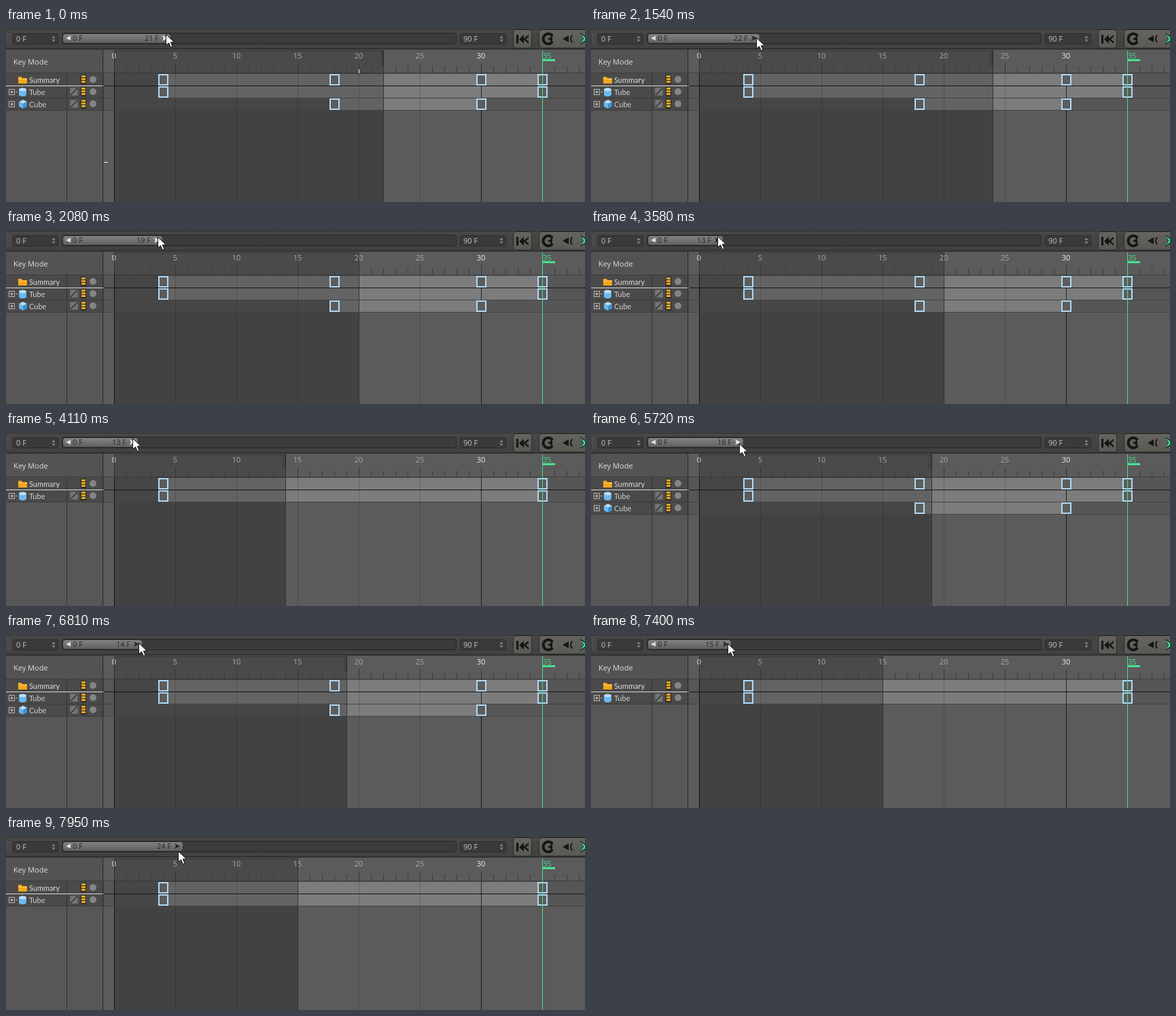
An HTML page with a canvas that plays this animation: 852 px wide and 257 px high, repeating every 8 s.

```html
<!DOCTYPE html>
<html lang="en">
<head>
<meta charset="utf-8">
<title>Timeline preview range</title>
<style>
html, body { margin: 0; width: 852px; height: 257px; overflow: hidden; background: #484848; }
canvas { display: block; }
</style>
</head>
<body>
<canvas id="stage" width="852" height="257"></canvas>
<script>
const ctx = document.getElementById('stage').getContext('2d');
const W = 852, H = 257, LOOP = 8000;
const SANS = '11px "Open Sans", "Noto Sans", sans-serif';
const NAMES = '11px Lato, "Open Sans", sans-serif';
const BLACK = '#151515', GREEN = '#49dc8c';

// Each drag: press and release times, step length, pointer path as [time, x, y]
const drags = [
  { from: 330, to: 950, step: 60, path: [[270, 235, 9], [750, 247, 13]] },
  { from: 1350, to: 2080, step: 63.3, path: [[1287, 247, 13], [1540, 243, 14], [1980, 223, 10]] },
  { from: 2540, to: 4110, step: 69.3, path: [[2471, 223, 10], [3340, 195, 9], [3578, 186, 9]] },
  { from: 4910, to: 5720, step: 61.4, path: [[4849, 186, 9], [5339, 211, 16], [5585, 218, 17]] },
  { from: 6320, to: 6940, step: 70, path: [[6250, 218, 17], [6810, 195, 13]] },
  { from: 7400, to: LOOP, step: 68.7, path: [[7331, 195, 13], [7949, 253, 22]] }
];
// Preview range after each release
const ranges = [[0, 22], [950, 24], [2080, 20], [4110, 14], [5720, 19], [6940, 15]];

const frameX = f => 159 + 18 * f;

function along(path, t) {
  if (t <= path[0][0]) return path[0].slice(1);
  for (let i = 1; i < path.length; i++) {
    const a = path[i - 1], b = path[i];
    if (t <= b[0]) {
      const k = (t - a[0]) / (b[0] - a[0]);
      return [1, 2].map(j => Math.round(a[j] + (b[j] - a[j]) * k));
    }
  }
  return path[path.length - 1].slice(1);
}

function stateAt(t) {
  const drag = drags.filter(d => t >= d.from).pop();
  let pos = [235, 9];
  if (drag) {
    const steps = Math.floor((t - drag.from) / drag.step + 0.001);
    pos = along(drag.path, drag.from + steps * drag.step);
  }
  const range = ranges.filter(r => t >= r[0]).pop()[1];
  return {
    x: pos[0], y: pos[1], range,
    last: Math.round((pos[0] - 109.5) / 6),
    pressed: !!drag && t < drag.to,
    marks: t < 330,
    cube: range > 18
  };
}

function rect(x, y, w, h, color) {
  ctx.fillStyle = color;
  ctx.fillRect(x, y, w, h);
}

function frame(x, y, w, h, color) {
  ctx.strokeStyle = color;
  ctx.lineWidth = 1;
  ctx.strokeRect(x + 0.5, y + 0.5, w - 1, h - 1);
}

function round(x, y, w, h, r, fill, stroke) {
  ctx.beginPath();
  ctx.roundRect(x + 0.5, y + 0.5, w - 1, h - 1, r);
  ctx.fillStyle = fill;
  ctx.fill();
  ctx.strokeStyle = stroke;
  ctx.lineWidth = 1;
  ctx.stroke();
}

function poly(points, color) {
  ctx.beginPath();
  points.forEach(p => ctx.lineTo(p[0], p[1]));
  ctx.closePath();
  ctx.fillStyle = color;
  ctx.fill();
}

function line(x1, y1, x2, y2, color, width = 1) {
  ctx.beginPath();
  ctx.moveTo(x1, y1);
  ctx.lineTo(x2, y2);
  ctx.strokeStyle = color;
  ctx.lineWidth = width;
  ctx.stroke();
}

function arc(x, y, r, a, b, color, width) {
  ctx.beginPath();
  ctx.arc(x, y, r, a, b);
  ctx.strokeStyle = color;
  ctx.lineWidth = width;
  ctx.stroke();
}

function text(s, x, y, color, align = 'left', font = SANS) {
  ctx.font = font;
  ctx.textAlign = align;
  ctx.fillStyle = color;
  ctx.fillText(s, x, y);
}

function shade(y0, y1, top, bottom) {
  const g = ctx.createLinearGradient(0, y0, 0, y1);
  g.addColorStop(0, top);
  g.addColorStop(1, bottom);
  return g;
}

function field(x, w, label) {
  round(x, 8, w, 16, 2, '#3a3a3a', '#2a2a2a');
  text(label, x + 5, 20, '#c4c4c4');
  const s = x + w - 7;
  poly([[s - 2.5, 15], [s, 11.5], [s + 2.5, 15]], '#858585');
  poly([[s - 2.5, 17], [s, 20.5], [s + 2.5, 17]], '#858585');
}

function transport() {
  const face = shade(2, 30, '#66645e', '#5a5954');
  round(746, 2, 28, 28, 4, face, '#2b2b2b');
  round(784, 2, 80, 28, 4, face, '#2b2b2b');
  rect(751, 10, 3, 13, BLACK);
  poly([[762, 10], [755, 16.5], [762, 23]], BLACK);
  poly([[769, 10], [761, 16.5], [769, 23], [769, 20], [765, 16.5], [769, 13]], BLACK);
  arc(798, 16, 7.5, 0.6, Math.PI * 2 - 0.6, BLACK, 4);
  poly([[797, 16], [804, 12], [804, 20]], BLACK);
  poly([[819, 16], [828, 11], [828, 21]], BLACK);
  arc(838, 16, 7, Math.PI - 0.85, Math.PI + 0.85, BLACK, 2);
  poly([[845, 7], [858, 16], [845, 25], [849, 16]], BLACK);
  poly([[846, 9], [856, 16], [846, 23], [850, 16]], '#35e093');
}

function topBar(s) {
  rect(0, 0, W, 32, shade(0, 32, '#484848', '#404040'));
  rect(0, 0, W, 1, '#4e4e4e');
  rect(0, 1, W, 1, '#292929');
  for (let y = 8; y < 25; y += 3) {
    rect(2, y, 1, 1, '#777777');
    rect(5, y + 1, 1, 1, '#777777');
  }
  field(10, 67, '0 F');
  field(668, 68, '90 F');
  round(82, 7, 581, 17, 3, '#3b3b3b', '#262626');
  const end = 117 + 6 * s.last;
  round(83, 8, end - 83, 15, 4, shade(8, 23, '#868686', '#5d5d5d'), '#303030');
  poly([[88, 15], [95, 11.5], [95, 18.5]], '#dddddd');
  text('0 F', 98, 19, '#292929');
  text(s.last + ' F', end - 18, 19, '#292929', 'right');
  poly([[end - 5, 15], [end - 13, 11], [end - 11, 15], [end - 13, 19]],
    s.pressed ? '#252525' : '#eeeeee');
  transport();
  rect(0, 30, W, 2, '#303030');
}

function expander(y) {
  frame(4, y - 5, 9, 9, '#b5b5b5');
  rect(6, y - 1, 5, 1, '#c8c8c8');
  rect(8, y - 3, 1, 5, '#c8c8c8');
}

function rowTools(y, slash) {
  rect(110, y - 7, 8, 14, '#282828');
  for (let i = 0; i < 3; i++) rect(111, y - 6 + i * 4, 6, 3, '#f5a71c');
  ctx.beginPath();
  ctx.arc(128, y, 5, 0, 7);
  ctx.fillStyle = '#858585';
  ctx.fill();
  if (slash) {
    rect(94, y - 6, 12, 12, '#757575');
    frame(94, y - 6, 12, 12, '#666666');
    line(95, y + 5, 105, y - 5, '#303030', 1.4);
  }
}

function tubeIcon(y) {
  poly([[19, y - 4], [30, y - 4], [30, y + 4], [27, y + 6], [22, y + 6], [19, y + 4]], '#6db8ee');
  ctx.beginPath();
  ctx.ellipse(24.5, y - 4, 5.5, 2.4, 0, 0, 7);
  ctx.fillStyle = '#b7defa';
  ctx.fill();
}

function cubeIcon(y) {
  poly([[19, y - 4], [25, y - 7], [31, y - 4], [25, y - 1]], '#b7defa');
  poly([[19, y - 4], [25, y - 1], [25, y + 6], [19, y + 3]], '#68b7ed');
  poly([[31, y - 4], [25, y - 1], [25, y + 6], [31, y + 3]], '#3f93d2');
}

function panel(s) {
  const bottom = s.cube ? 121 : 103;
  rect(0, 32, 144, H - 32, '#575757');
  rect(0, 32, 144, 35, '#535353');
  rect(0, 67, 144, bottom - 67, '#4a4a4a');
  text('Key Mode', 11, 54, '#dddddd');
  rect(0, 66, 144, 1, '#3b3b3b');
  rect(89, 67, 1, H - 67, '#323232');
  rect(0, 103, 144, 1, '#3b3b3b');
  poly([[18, 72], [23, 72], [24, 74], [31, 74], [31, 82], [18, 82]], '#f8a51b');
  rect(18, 75, 13, 1, '#ffc75c');
  text('Summary', 34, 81, '#dddddd', 'left', NAMES);
  rowTools(76, false);
  rect(0, 85, 144, 1, '#d8d8d8');
  expander(95);
  rect(14, 94, 3, 1, '#b5b5b5');
  tubeIcon(95);
  text('Tube', 34, 99, '#d0d0d0', 'left', NAMES);
  rowTools(94, true);
  if (s.cube) {
    rect(0, 121, 144, 1, '#3b3b3b');
    expander(113);
    cubeIcon(113);
    text('Cube', 34, 117, '#d0d0d0', 'left', NAMES);
    rowTools(112, true);
  }
  rect(142, 32, 1, H - 32, '#2b2b2b');
}

function bar(a, b, y, end) {
  const x0 = frameX(a), x1 = frameX(b);
  rect(x0, y, x1 - x0, 17, '#7c7c7c');
  const dark = Math.min(x1, end) - x0;
  if (dark > 0) rect(x0, y, dark, 17, '#636363');
}

function key(f, y) {
  const x = frameX(f) - 7;
  rect(x, y, 15, 17, '#b0d9f6');
  rect(x + 2, y + 2, 11, 13, '#5c5c5c');
}

function timeline(s) {
  const end = frameX(s.range);
  const rows = [
    { y: 68, a: 4, b: 35, keys: s.cube ? [4, 18, 30, 35] : [4, 35] },
    { y: 86, a: 4, b: 35, keys: [4, 35] }
  ];
  if (s.cube) rows.push({ y: 104, a: 18, b: 30, keys: [18, 30] });

  rect(144, 32, W - 144, H - 32, '#5b5b5b');
  rect(159, 33, end - 159, 34, '#4a4a4a');
  rect(159, 67, end - 159, H - 67, '#424242');
  rows.forEach(r => {
    rect(144, r.y, W - 144, 17, '#565656');
    rect(159, r.y, end - 159, 17, '#464646');
    bar(r.a, r.b, r.y, end);
  });

  for (let f = 0; f < 39; f++) {
    const x = frameX(f), strong = f % 30 === 0;
    if (f % 5) {
      rect(x, 57, 1, 9, '#3c3c3c');
    } else {
      rect(x, 52, 1, 15, '#363636');
      rect(x, 67, 1, H - 67, strong ? 'rgba(0,0,0,.7)' : 'rgba(0,0,0,.17)');
      if (f !== 35) text(f, x, 45, strong ? '#eeeeee' : '#aaaaaa', 'center');
    }
  }
  rect(144, 66, W - 144, 1, '#393939');
  rows.forEach((r, i) => rect(144, r.y + 17, W - 144, 1, i ? '#434343' : BLACK));

  rect(159, 33, end - 159, 1, '#303030');
  rect(159, 33, 1, 34, '#303030');
  rect(end, 33, 1, H - 33, '#333333');
  if (s.range % 5) {
    rect(end - 4, 34, 4, 22, '#424242');
    rect(end, 33, 1, 23, '#242424');
  }

  rect(789, 33, 1, H - 33, GREEN);
  rows.forEach(r => r.keys.forEach(f => key(f, r.y)));
  rect(789, 67, 1, H - 67, GREEN);
  text('35', 790, 45, GREEN);
  rect(790, 46, 18, 3, '#49e391');

  if (s.marks) {
    rect(519, 61, 1, 6, '#f2f2f2');
    rect(144, 198, 6, 1, '#f2f2f2');
  }
}

function pointer(x, y) {
  const shape = [[0, 0], [0, 16], [4, 12.5], [7, 19], [9.5, 18], [6.8, 11.5], [12, 11.5]]
    .map(p => [p[0] + x + 0.5, p[1] + y + 0.5]);
  poly(shape, '#ffffff');
  ctx.strokeStyle = '#111111';
  ctx.lineWidth = 1;
  ctx.stroke();
}

function draw(t) {
  const s = stateAt(t);
  timeline(s);
  panel(s);
  topBar(s);
  pointer(s.x, s.y);
}

const start = performance.now();
function tick() {
  draw((performance.now() - start) % LOOP);
  requestAnimationFrame(tick);
}
tick();
</script>
</body>
</html>
```
